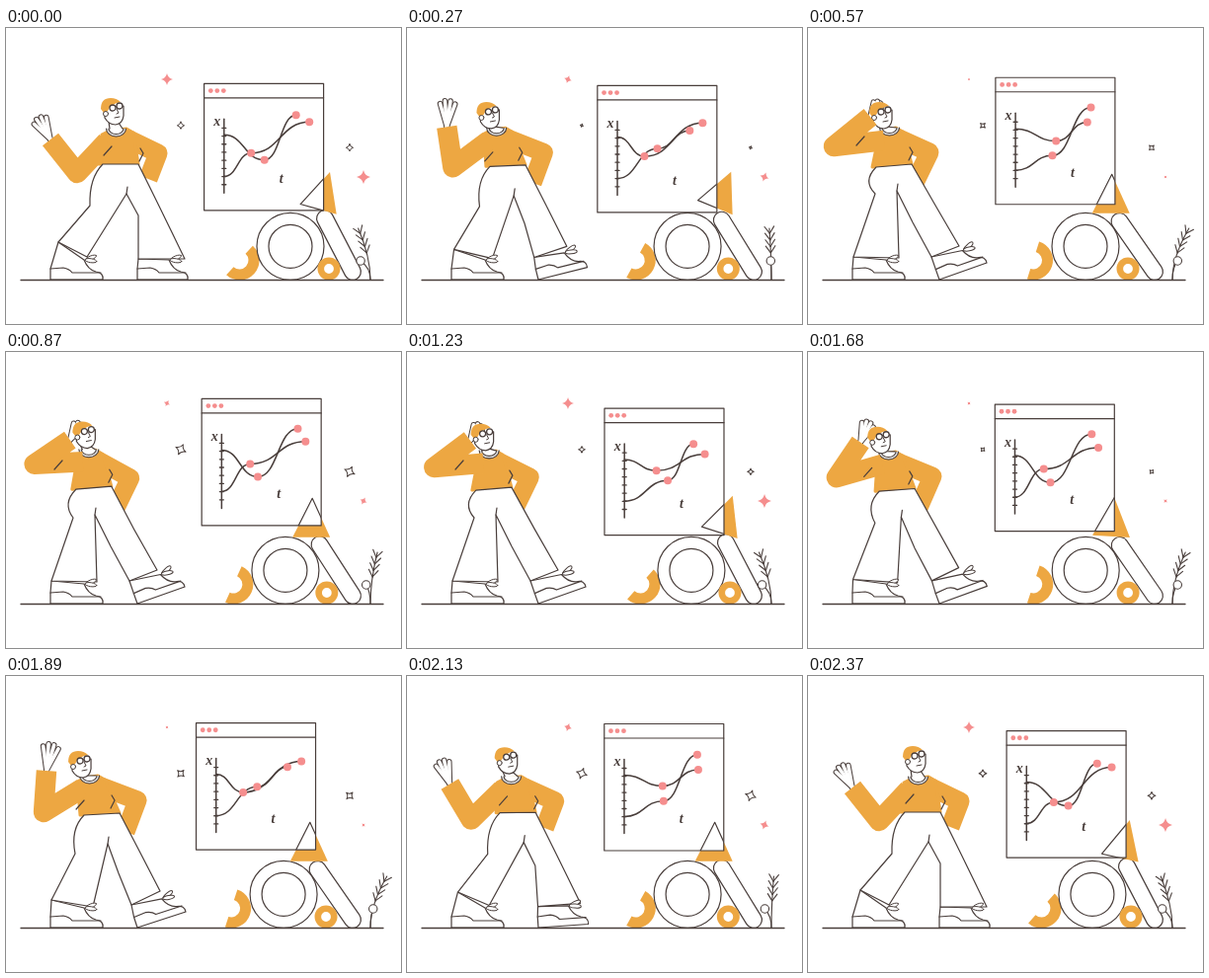
Recreate the animation shown at these times as an HTML page with a canvas. Size 400x300 px, loop 2.4 s.

```html
<!DOCTYPE html>
<html lang="en">
<head>
<meta charset="utf-8">
<title>Observer and floating chart</title>
<style>
html, body { margin: 0; height: 100%; overflow: hidden; background: #fff; }
canvas { display: block; }
</style>
</head>
<body>
<canvas id="stage" width="400" height="300"></canvas>
<script>
const ctx = document.getElementById('stage').getContext('2d');
const LOOP = 2400, TAU = 2 * Math.PI;
const INK = '#493e3b', ORANGE = '#eda742', PINK = '#f58e8e', WHITE = '#fff';
const { cos, sin, max, atan2, hypot } = Math;
const mix = (a, b, k) => a + (b - a) * k;
const mixPoint = (a, b, k) => [mix(a[0], b[0], k), mix(a[1], b[1], k)];
const shift = (p, x, y) => [p[0] + x, p[1] + y];

function paint(fill, stroke, width = 1.2) {
  if (fill) { ctx.fillStyle = fill; ctx.fill(); }
  if (stroke) { ctx.strokeStyle = stroke; ctx.lineWidth = width; ctx.stroke(); }
}
function poly(points, fill, stroke, width) {
  ctx.beginPath();
  points.forEach(p => ctx.lineTo(...p));
  if (fill) ctx.closePath();
  paint(fill, stroke, width);
}
function disc(x, y, r, fill, stroke, width) {
  ctx.beginPath();
  ctx.arc(x, y, r, 0, TAU);
  paint(fill, stroke, width);
}
function curve(d, fill, stroke, width) {
  const path = new Path2D(d);
  if (fill) { ctx.fillStyle = fill; ctx.fill(path); }
  if (stroke) { ctx.strokeStyle = stroke; ctx.lineWidth = width || 1.2; ctx.stroke(path); }
}
function at(x, y, angle, draw) {
  ctx.save();
  ctx.translate(x, y);
  ctx.rotate(angle);
  draw();
  ctx.restore();
}

// Joints: head, hand, wrist, elbow, shoulder, far shoulder, far elbow, far hand,
// hips, near knee, near cuff (2), crotch, far inner knee, far cuff (2), far knee, far toe, sleeve fold
const pairs = list => list.flatMap((v, i) => i % 2 ? [] : [[v, list[i + 1]]]);
const open = pairs([109,86, 33,91, 45,113, 72,147, 102,115, 125,113, 154,127, 144,153, 94,138, 134,138,
  85,180, 53,217, 82,232, 122,168, 134,190, 134,234, 181,234, 155,180, 184,255, 103,125]);
const salute = pairs([75,90, 72,75, 63,90, 26,120, 77,114, 92,112, 123,126, 108,157, 65,141, 105,138,
  68,168, 46,232, 92,233, 90,165, 106,197, 125,232, 153,221, 129,180, 181,238, 53,115]);
const wave = pairs([76,91, 46,69, 41,96, 38,138, 77,114, 96,112, 133,126, 121,158, 75,141, 115,139,
  70,180, 46,227, 88,234, 103,170, 114,200, 127,232, 156,218, 136,179, 182,239, 75,131]);
const lift = pairs([6,-5, 3,-3, 2,-1, 3,-7, 1,-3, 2,-2, 3,2, 3,2, 2,-2, 2,-2]);
const raised = salute.map((p, i) => shift(p, ...(lift[i] || [0, 0])));
const keys = [[0, open], [90, open], [330, wave], [560, salute], [950, raised],
  [1470, salute], [1890, wave], [2250, open], [LOOP, open]];

// Hermite blend that rests on every pose except the passing wave
function poseAt(t) {
  const i = keys.findIndex((k, n) => n && t <= k[0]);
  const [t0, a] = keys[i - 1], [t1, b] = keys[i], span = t1 - t0, u = (t - t0) / span;
  const slope = (n, j, c) => {
    if (keys[n][1] !== wave) return 0;
    const [before, after] = [keys[n - 1], keys[n + 1]];
    return (after[1][j][c] - before[1][j][c]) / (after[0] - before[0]) * span;
  };
  const ease = u * u * (3 - 2 * u);
  return a.map((p, j) => [0, 1].map(c => mix(p[c], b[j][c], ease)
    + slope(i - 1, j, c) * u * (1 - u) ** 2 - slope(i, j, c) * u * u * (1 - u)));
}

// Runs draw(length) with the sole lying on the x axis
function onSole(heel, toe, draw) {
  const dx = toe[0] - heel[0], dy = toe[1] - heel[1];
  at(...heel, atan2(dy, dx), () => draw(hypot(dx, dy)));
}
function drawShoe(cuff, heel, toe) {
  const angle = atan2(toe[1] - heel[1], toe[0] - heel[0]);
  const x = cuff[0] - heel[0], y = cuff[1] - heel[1];
  const back = [x * cos(angle) + y * sin(angle), y * cos(angle) - x * sin(angle)];
  onSole(heel, toe, length => {
    curve(`M${back} L0,-11 L0,0 L${length},0 Q${length + 1},-7 ${length - 7},-8
      Q${length - 15},-10 ${length - 19},-20 Z`, WHITE, INK);
    curve(`M0,-11 L13,-12 Q19,-11 22,-7 L${length - 2},-7`, null, INK);
  });
}
function drawBow(heel, toe) {
  onSole(heel, toe, length => {
    for (const tilt of [-.4, .15]) {
      ctx.beginPath();
      ctx.ellipse(length - 12, -20 + tilt * 5, 6, 2, tilt, 0, TAU);
      paint(WHITE, INK, 1);
    }
  });
}

function drawHead([x, y]) {
  at(x, y, 0, () => {
    curve('M-9,-5 L-9,5 Q-5,12 2,12 Q9,11 10,3 L10,-7 Z', WHITE, INK);
    curve('M-13,-4 Q-13,-15 -3,-15 Q3,-15 7,-11 Q-3,-9 -6,-2 L-10,0 Z', ORANGE);
    disc(-8, 1, 2.5, WHITE, INK, 1);
    disc(-1, -5, 3, WHITE, INK, 1.3);
    disc(6, -7, 3, WHITE, INK, 1.3);
    curve('M3,-4 L5,0 L3,1 M1,5 L6,4', null, INK, 1);
  });
}

function drawHand(wrist, tip) {
  const angle = atan2(tip[1] - wrist[1], tip[0] - wrist[0]);
  const length = hypot(tip[0] - wrist[0], tip[1] - wrist[1]);
  for (const [color, width] of [[INK, 5.6], [WHITE, 3.6]])
    for (let i = -1.5; i <= 1.5; i++) {
      const a = angle + i * .21, r = length - i * i;
      poly([wrist, shift(wrist, r * cos(a), r * sin(a))], null, color, width);
    }
}

function drawNeck(head, [x, y]) {
  for (const [rx, ry, fill] of [[10, 8, '#ddd'], [7.5, 5.5, WHITE]]) {
    ctx.beginPath();
    ctx.ellipse(x, y, rx, ry, 0, 0, TAU / 2);
    paint(fill, INK, 1.1);
  }
  const sides = [[shift(head, -5, 9), [x - 6.5, y]], [shift(head, 5, 10), [x + 6.5, y]]];
  poly([...sides[0], ...sides[1].slice().reverse()], WHITE);
  sides.forEach(side => poly(side, null, INK));
}

function drawPerson(t) {
  const [head, hand, wrist, elbow, nearArm, farArm, farElbow, farHand, hipL, hipR, kneeL,
    cuffL, cuffL2, crotch, kneeIn, cuffR, cuffR2, kneeR, toe, fold] = poseAt(t);
  const nearSole = [[45, 255], [98, 255]], farSole = [[133, 255], toe];
  drawShoe(cuffL, ...nearSole);
  drawShoe(cuffR, ...farSole);

  ctx.lineCap = 'butt';
  poly([farArm, farElbow, farHand], null, ORANGE, 19);
  poly([shift(nearArm, -5, -7), shift(nearArm, 3, -11), shift(farArm, -3, -11), shift(farArm, 4, -7),
    hipR, hipL], ORANGE, ORANGE, 3);
  ctx.lineCap = 'round';
  poly([shift(farArm, 11, 9), shift(farArm, 14, 14), shift(farArm, 10, 22)], null, INK);

  curve(`M${shift(hipL, 4, 0)} Q${shift(hipL, -10, 14)} ${kneeL} L${cuffL} L${cuffL2} L${crotch}
    L${kneeIn} L${cuffR} L${cuffR2} Q${kneeR} ${hipR} Z`, WHITE, INK);
  poly([crotch, shift(crotch, 1, -7)], null, INK);
  drawBow(...nearSole);
  drawBow(...farSole);

  drawNeck(head, shift(mixPoint(nearArm, farArm, .5), -2, -12));
  drawHand(wrist, hand);
  drawHead(head);
  ctx.lineCap = 'butt';
  poly([nearArm, elbow, wrist], null, ORANGE, 20.5);
  ctx.lineCap = 'round';
  poly([shift(fold, 4, -5), shift(fold, -4, 4)], null, INK);
}

function drawWindow(x, y, t) {
  at(x, y, 0, () => {
    ctx.beginPath();
    ctx.rect(0, 0, 121, 128.5);
    paint(WHITE, INK, 1.2);
    poly([[0, 14.5], [121, 14.5]], null, INK);
    for (const dx of [6.7, 13.2, 19.7]) disc(dx, 7.2, 2.4, PINK);
    poly([[20.2, 36], [20.2, 111]], null, INK, 1.5);
    for (let i = 0; i < 8; i++) poly([[18.2, 45 + i * 8.2], [22.2, 45 + i * 8.2]], null, INK, 1.3);
    ctx.fillStyle = INK;
    ctx.textAlign = 'center';
    ctx.font = 'italic bold 14px "Liberation Serif", serif';
    ctx.fillText('x', 13.2, 42.5);
    ctx.fillText('t', 78, 101);

    const orbit = (cx, cy, angle) => {
      const a = angle + 3 * TAU * t / LOOP;
      return [cx + 8.4 * cos(a), cy + 8.4 * sin(a)];
    };
    const link = (a, b) => `C${(a[0] + b[0]) / 2},${a[1]} ${(a[0] + b[0]) / 2},${b[1]} ${b}`;
    const lines = [[52, .91], [94, 3.18]].map(([y0, angle]) =>
      [[20.2, y0], orbit(56, 70.8, angle), orbit(98.2, 38.6, angle + TAU / 2)]);
    for (const [a, b, c] of lines) curve(`M${a} ${link(a, b)} ${link(b, c)}`, null, INK, 1.5);
    for (const [, b, c] of lines) { disc(...b, 4, PINK); disc(...c, 4, PINK); }
  });
}

function drawShapes(phase, t) {
  const roll = ((1 + cos(phase)) / 2) ** 1.5;
  const spin = phase + TAU * .095;
  const x = 195.5 + 6.2 * cos(spin), y = 52.9 + 6.1 * sin(spin);

  at(228 + 8.5 * roll, 235.5, .31 + 8.5 * roll / 20, () => {
    ctx.lineCap = 'butt';
    ctx.beginPath();
    ctx.arc(0, 0, 14.5, -TAU / 4, TAU / 4);
    paint(null, ORANGE, 11);
    ctx.lineCap = 'round';
  });
  disc(281 + 7 * roll, 221.3, 34, WHITE, INK);
  disc(281 + 7 * roll, 221.3, 22, WHITE, INK);

  const rod = [[351, 247], [315.5 + 7.5 * roll, 196 - 3 * roll]];
  poly(rod, null, INK, 18);
  poly(rod, null, WHITE, 15.6);
  disc(324 + 3 * roll, 244, 8.2, WHITE, ORANGE, 6.6);

  const tip = max(0, cos(phase - TAU * .16)) ** .7;
  const angle = tip * .42, corner = [325.7 + 9 * roll, 187.8 + 1.5 * tip];
  const triangle = [[0, 0], [-38, 0], [-18, -39.5]].map(([px, py]) =>
    shift(corner, px * cos(angle) - py * sin(angle), px * sin(angle) + py * cos(angle)));
  poly(triangle, ORANGE);
  drawWindow(x, y, t);
  ctx.save();
  ctx.beginPath();
  ctx.rect(x, y, 121, 128.5);
  ctx.clip();
  poly([...triangle, triangle[0]], null, INK);
  ctx.restore();
}

function drawPlant(phase) {
  const top = [371.5 - 15 * cos(phase - TAU * .025), 203];
  const pod = [366.5 - 8 * cos(phase + TAU * .06), 236];
  const root = [369, 255], bend = [369, 232];
  curve(`M${root} Q${bend} ${top}`, null, INK, 1.1);
  for (let i = 0; i < 4; i++) {
    const k = .55 + i * .12;
    const a = mixPoint(root, bend, k), b = mixPoint(bend, top, k);
    const dir = atan2(b[1] - a[1], b[0] - a[0]), p = mixPoint(a, b, k);
    for (const side of [-.6, .6])
      poly([p, shift(p, 8.5 * cos(dir + side), 8.5 * sin(dir + side))], null, INK, 1.1);
  }
  curve(`M${root} Q${root[0]},243 ${pod}`, null, INK, 1.1);
  disc(...pod, 4.2, WHITE, INK, 1.1);
}

function sparkle(x, y, r, angle, fill, stroke) {
  const q = r * .18;
  at(x, y, angle, () => curve(`M0,${-r} Q${q},${-q} ${r},0 Q${q},${q} 0,${r}
    Q${-q},${q} ${-r},0 Q${-q},${-q} 0,${-r} Z`, fill, stroke, 1));
}

function frame(now) {
  const t = now % LOOP, phase = 2 * TAU * t / LOOP;
  ctx.fillStyle = WHITE;
  ctx.fillRect(0, 0, 400, 300);
  ctx.lineJoin = ctx.lineCap = 'round';

  const glow = (1 + cos(phase)) / 2, turn = (1 - glow) * TAU / 8;
  sparkle(163, 52, 6 * (.25 + .75 * glow), turn, PINK);
  sparkle(362, 151, 7 * (.25 + .75 * glow), turn, PINK);
  const size = 3.6 - 2 * sin(phase);
  sparkle(177, 98.8, size, turn, WHITE, INK);
  sparkle(348, 121.3, size, turn, WHITE, INK);

  drawShapes(phase, t);
  drawPlant(phase);
  drawPerson(t);
  poly([[15, 255.5], [382, 255.5]], null, INK, 1.3);
  requestAnimationFrame(frame);
}
requestAnimationFrame(frame);
</script>
</body>
</html>
```
